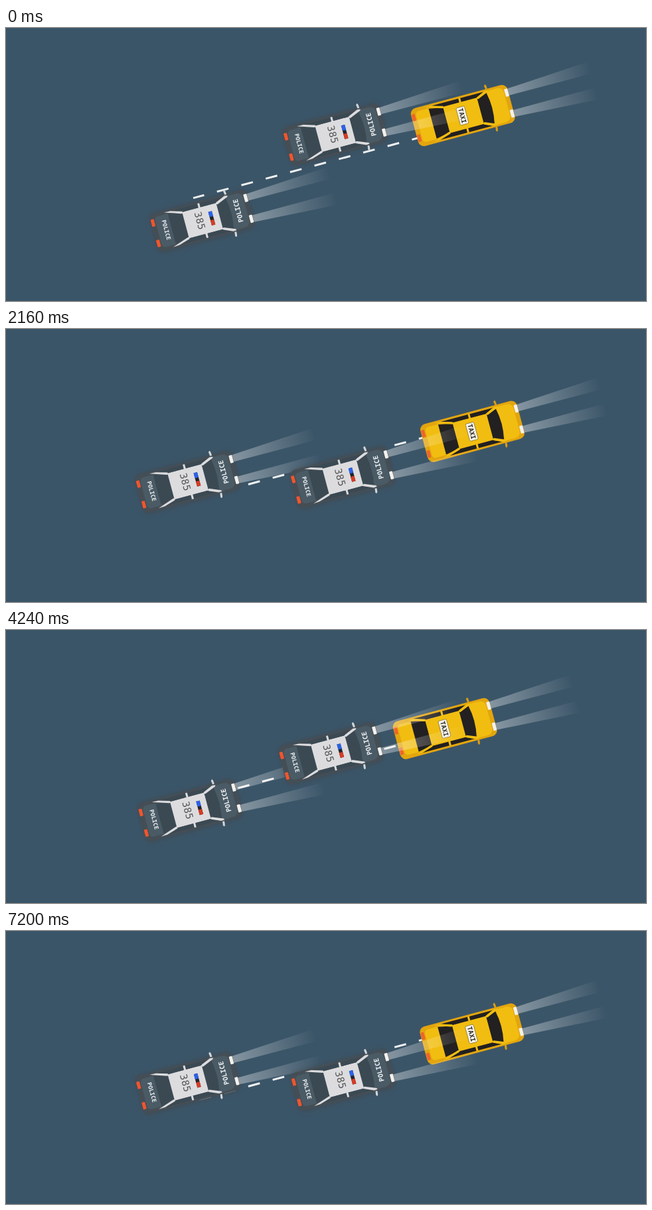
These frames come from a looping animation (964 px wide and 412 px high, 7280 ms). An HTML page:

```html
<!DOCTYPE html>
<html lang="en">
<head>
<meta charset="utf-8">
<title>Night chase</title>
<style>
  html, body { margin: 0; width: 100%; height: 100%; overflow: hidden; background: #3b5568; }
  svg { display: block; width: 964px; height: 412px; }
  text {
    font-family: "DejaVu Sans Mono", "Noto Sans Mono", monospace;
    text-anchor: middle;
    dominant-baseline: central;
  }
  .police { --rim: #454e55; --panel: #4a5b66; --glass: #3b4953; --roof: #dcdcde; --mirror: #d3d6d8; --tail: #f0552e; }
  .taxi { --rim: #e2a50f; --panel: #f1bd10; --glass: #222021; --roof: #f1bd10; --mirror: #d99d12; --tail: #ee642a; }
  .rim { fill: var(--rim); }
  .panel { fill: var(--panel); }
  .glass { fill: var(--glass); }
  .roof { fill: var(--roof); }
  .mirror { fill: var(--mirror); }
  .tail { fill: var(--tail); }
  .lamp { fill: #f3f1ee; }
  .word { fill: #eef2f4; font-weight: bold; }
</style>
</head>
<body>
<svg viewBox="0 0 964 412">
  <defs>
    <linearGradient id="glow">
      <stop offset="0" stop-color="#fff" stop-opacity=".38"/>
      <stop offset="1" stop-color="#fff" stop-opacity="0"/>
    </linearGradient>
    <filter id="soft" x="-10%" y="-25%" width="120%" height="150%">
      <feGaussianBlur stdDeviation="3"/>
    </filter>

    <!-- upper half of a car, mirrored for the lower one -->
    <g id="side">
      <path class="mirror" d="M115.2-29 114.4-34.5Q114.8-37 116.6-36.5 118-35 118-29Z"/>
      <path class="glass" d="M30-26.5H111L99-20.5H48Z"/>
      <path class="roof" d="M20-27 30-26.5 47-21.5V-18.5H45ZM98-19.5 100-21.5 114-27.5 119-27 118-25 101-18Z"/>
      <path class="roof" d="M72-27H75V-19H72Z"/>
      <rect class="tail" x="-2.5" y="-21.5" width="5" height="11" rx="1"/>
      <rect class="lamp" x="142.2" y="-22.3" width="5" height="12" rx="1"/>
    </g>
    <g id="shell">
      <rect class="rim" x="-3.2" y="-29.6" width="150.7" height="59.2" rx="9"/>
      <path class="panel" d="M27-24H10Q4-24 4-17V17Q4 24 10 24H27Z"/>
      <path class="panel" d="M116-26.5H132Q141-25.5 141-17V17Q141 25.5 132 26.5H116Z"/>
      <path class="glass" d="M25-23.5 47-19V19L25 23.5Z"/>
      <path class="glass" d="M98.5-19 115-24Q120.5 0 115 24L98.5 19Z"/>
      <path class="roof" d="M46.5-20.5H99.5V20.5H46.5Z"/>
      <use href="#side"/>
      <use href="#side" transform="scale(1 -1)"/>
    </g>
    <g id="beams" fill="url(#glow)">
      <path d="M147.5-22 276-29.5V-11L147.5-11.5Z"/>
      <path d="M147.5 22 276 29.5V11L147.5 11.5Z"/>
    </g>
    <g id="patrol" class="police">
      <rect x="-4" y="-31" width="153" height="63" rx="10" fill="#404448" opacity=".5" filter="url(#soft)"/>
      <use href="#shell"/>
      <text class="word" font-size="8.6" transform="translate(16.5 -.6) rotate(90)">POLICE</text>
      <text class="word" font-size="10" transform="translate(128.6 -.6) rotate(-90)">POLICE</text>
      <text fill="#545456" font-size="14.6" letter-spacing=".4" transform="translate(69.3 -.8) rotate(90)">385</text>
      <rect x="84.6" y="-10.5" width="5.5" height="21" fill="#22242c"/>
      <rect x="84.6" y="-10.5" width="5.5" height="8" fill="#2c62ea"/>
      <rect x="84.6" y="2.5" width="5.5" height="8" fill="#d63c24"/>
      <use href="#beams"/>
    </g>
  </defs>

  <!-- the road runs along the x axis of this group -->
  <g transform="rotate(-15)">
    <path id="road" d="M206 320.9H597" stroke="#f1f3f4" stroke-width="3" stroke-dasharray="18 20"/>
    <g id="cab" class="taxi">
      <use href="#shell"/>
      <rect x="64.8" y="-13.5" width="13" height="27" rx="2" fill="#f6f3ea" stroke="#7d6a22" stroke-width=".7"/>
      <text fill="#2b2826" font-weight="bold" font-size="9.6" transform="translate(71.3 0) rotate(90)">TAXI</text>
      <use href="#beams"/>
    </g>
    <use id="rear" href="#patrol"/>
    <use id="lead" href="#patrol"/>
  </g>
</svg>
<script>
  const LOOP = 7280, STEP = 80, SWAY = 5000, DELAY = 20, LANE = 320.5;
  const [road, cab, lead, rear] = ["road", "cab", "lead", "rear"].map(id => document.getElementById(id));

  // linear run through evenly spaced values, repeated every SWAY ms
  function along(values, t) {
    const p = ((t + SWAY - DELAY) % SWAY) / SWAY * (values.length - 1);
    const i = Math.floor(p);
    return values[i] + (values[i + 1] - values[i]) * (p - i);
  }

  function place(car, x, y) {
    car.setAttribute("transform", `translate(${x.toFixed(2)} ${(LANE + y).toFixed(2)})`);
  }

  function draw(now) {
    const t = Math.floor((now % LOOP) / STEP) * STEP;
    const swerve = along([1, -1, 1], t);
    const lag = along([0, -21, 0, -21, 0], t);
    place(rear, 138.1 + lag, 37.6 * swerve);
    place(lead, 365.2 + lag, -37.6 * swerve);
    place(cab, 559.2 + along([0, 25, 0, -50, 0], t), -15 * swerve);
    road.setAttribute("stroke-dashoffset", 1 + 38 * (t % 280) / 280);
  }

  function tick() {
    draw(performance.now());
    requestAnimationFrame(tick);
  }
  tick();
</script>
</body>
</html>
```
